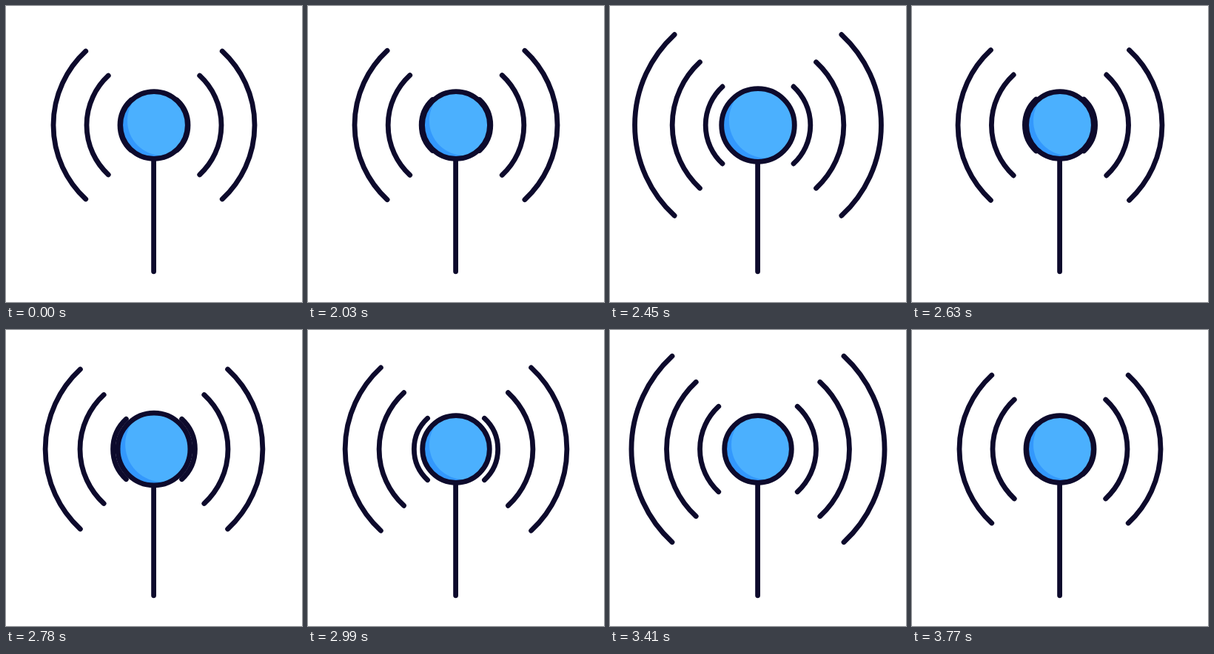
Write an HTML page that moves like this. It is 400 by 400 pixels and loops after 3.8 s.

```html
<!DOCTYPE html>
<html>
<head>
<meta charset="utf-8">
<style>
  html, body { margin: 0; width: 100%; height: 100%; overflow: hidden; background: #fff; }
  svg { display: block; width: 100vw; height: 100vh; }
  .ink { fill: none; stroke: #0d0a2c; stroke-width: 6.8; stroke-linecap: round; }
</style>
</head>
<body>
<svg viewBox="0 0 400 400">
  <defs><clipPath id="disc"><circle r="45.3"/></clipPath></defs>
  <path class="ink" d="M199.6 200V358.8"/>
  <path class="ink wave"/>
  <path class="ink wave"/>
  <path class="ink wave"/>
  <g id="fill" clip-path="url(#disc)">
    <circle r="46" fill="#3398fd"/>
    <circle cx="11" cy="-6" r="47" fill="#4bb0fe"/>
  </g>
  <circle id="rim" class="ink" cx="200" cy="161" stroke-width="7"/>
</svg>
<script>
const LOOP = 3800, START = 2030, STEP = 30;
const CX = 200, CY = 161, ANGLE = 47.3 * Math.PI / 180, BALL = 45.3;

// Each pulse: start, end, height
const ballPulses = [[1996, 2641, 6.2], [2700, 2990, 6.2], [3000, 3400, 6.2]];
const waves = [
  { r: 46, pulses: [[1996, 2678, 33], [2723, 3051, 35], [3112, 3665, 33]] },
  { r: 91, pulses: [[1996, 2678, 33], [2723, 3060, 35], [3112, 3665, 33]] },
  { r: 136, pulses: [[1996, 2678, 40.5], [2725, 3053, 43], [3070, 3640, 38.5]] }
];
const paths = document.querySelectorAll('.wave');
const fill = document.getElementById('fill');
const rim = document.getElementById('rim');

function swell(pulses, t) {
  for (const [from, to, height] of pulses)
    if (t > from && t < to)
      return height * (1 - Math.cos(2 * Math.PI * (t - from) / (to - from))) / 2;
  return 0;
}

function arcPair(r) {
  const x = r * Math.cos(ANGLE), y = r * Math.sin(ANGLE);
  const side = (s, sweep) =>
    `M${CX + s * x} ${CY - y}A${r} ${r} 0 0 ${sweep} ${CX + s * x} ${CY + y}`;
  return side(-1, 0) + side(1, 1);
}

function draw(now) {
  const time = now % LOOP;
  const t = time < START ? 0 : START + Math.floor((time - START) / STEP) * STEP;
  waves.forEach((w, i) => paths[i].setAttribute('d', arcPair(w.r + swell(w.pulses, t))));
  const r = BALL + swell(ballPulses, t);
  rim.setAttribute('r', r);
  fill.setAttribute('transform', `translate(${CX} ${CY}) scale(${r / BALL})`);
  requestAnimationFrame(draw);
}
draw(0);
</script>
</body>
</html>
```
